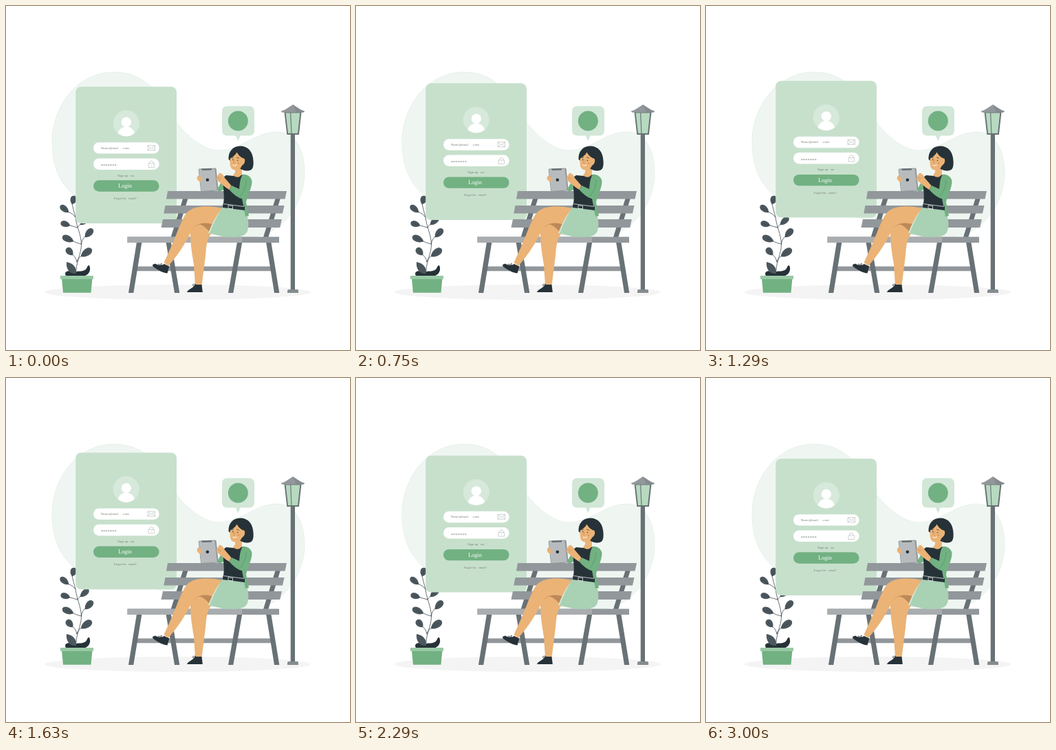
An HTML page for the animation above (3040 ms loop, 500x500 px).

```html
<!DOCTYPE html>
<html lang="en">
<head>
<meta charset="utf-8">
<title>Login on a park bench</title>
<style>
  html, body { margin: 0; width: 100%; height: 100%; overflow: hidden; background: #fff; }
  svg { display: block; width: 100vw; height: 100vh; }
  text { font-family: "Liberation Serif", "Noto Serif", serif; font-size: 5px; fill: #758179; white-space: pre; }
  .small { font-size: 4.4px; }
  .dark { fill: #263238; }
  .steel { fill: #687175; }
  .slat { fill: #92979b; }
  .green { fill: #72b182; }
  .skin { fill: #ebb376; }
  .shade { fill: #bd8958; }
  .line { fill: none; stroke: #b4bbb7; stroke-width: .65; }
  .ink { fill: none; stroke: #263238; stroke-width: .7; stroke-linecap: round; }
</style>
</head>
<body>
<svg viewBox="0 0 500 500">
  <defs>
    <clipPath id="disc"><circle cx="174.8" cy="170.4" r="19"/></clipPath>
  </defs>

  <path fill="#eff6f2" stroke="#d6e6db" stroke-width=".5" d="M157 96C105 96 67 144 67 198C67 235 80 262 105 280C140 303 210 296 250 318C288 335 330 337 362 335C400 331 434 288 434 243C434 207 419 183 394 183C362 183 341 210 309 210C286 209 264 189 249 171C231 147 214 96 157 96Z"/>
  <ellipse cx="249.5" cy="416" rx="193.5" ry="11" fill="#f4f4f4"/>

  <g id="plant">
    <path class="ink" stroke-width="1" d="M102 391C100 375 110 360 109.500 346C109 332 103 322 101 307C99 299 97 293 96 287M101 307C98 303 95 301 91 299.500M104 322C100 321 97 320 93 319M104 322C105 320 106 319 108 317.500M109.500 346C105 345 102 344 98 342M109.500 346C110 341 112 338 115 335M103 372C102 367 100 364 97 361.500M103 372C104 368 106 366 109 363.500"/>
    <g id="leaves" fill="#4b575d"></g>
    <path class="dark" d="M87 392C84 387 89 384 95 386C94 381 98 381 101 387C104 384 109 387 114 384C119 382 117 377 121 377C124 383 121 390 115 392Z"/>
    <path fill="#4b575d" d="M102 389C92 390 87 382 88 372C97 374 103 379 102 389Z"/>
    <path class="green" d="M81 396H125.500L123.500 416.800H83Z"/>
    <path fill="#98c9a4" d="M79 392H127V397H79Z"/>
  </g>

  <g id="card">
    <rect x="101.200" y="117.200" width="146.800" height="198.800" rx="8" fill="#c7e0cc"/>
    <circle cx="174.800" cy="170.400" r="19" fill="#d6e9db"/>
    <g fill="#fff">
      <circle cx="174.800" cy="168.800" r="7.200"/>
      <path clip-path="url(#disc)" d="M161 192C162 181 167 175.500 174.800 175.500S187.600 181 188.600 192Z"/>
      <rect x="127" y="198.200" width="95.600" height="16.400" rx="8.200"/>
      <rect x="127" y="221.500" width="95.600" height="16.400" rx="8.200"/>
    </g>
    <rect class="green" x="127" y="253.300" width="95.600" height="16.400" rx="8.200"/>
    <path class="line" d="M206 202.700H216.500V209.700H206ZM206 202.700L211.250 207L216.500 202.700M206 209.700L209.800 206M216.500 209.700L212.700 206"/>
    <path class="line" d="M207 229H215.600V234.500H207ZM208.600 229V227.500Q208.600 225.400 211.300 225.400T214 227.500V229M211.300 231V232.500"/>
    <text x="137.700" y="207.700">Name@mail</text>
    <text x="169" y="207.700">.com</text>
    <text x="137.700" y="234.200" style="font-size:6.600px">*******</text>
    <text x="162" y="247.600">Sign up</text>
    <text x="181" y="247.600">on</text>
    <text x="173" y="264.200" text-anchor="middle" style="font-size:8.200px;fill:#fff">Login</text>
    <text class="small" x="156.500" y="281">Forgot the</text>
    <text class="small" x="178" y="281">email?</text>
  </g>

  <g id="bubble">
    <path fill="#d2e7d7" d="M322 145.500H353Q361 145.500 361 153.500V180.500Q361 188.500 353 188.500H340.500L337.300 196.500L334 188.500H322Q314 188.500 314 180.500V153.500Q314 145.500 322 145.500Z"/>
    <circle class="green" cx="337.300" cy="167" r="14.500"/>
  </g>

  <g id="lamp">
    <path class="steel" d="M413.700 187H420V413H413.700Z"/>
    <path fill="#858c90" d="M409 417V414Q409 412 411 412H423Q425 412 425 414V417Z"/>
    <path class="steel" d="M404.500 154H429.500L425.800 187H408.300Z"/>
    <path fill="#b7d9c0" d="M406.600 155.500H427.300L424 185H410Z"/>
    <path stroke="#687175" stroke-width="1.100" d="M413.600 155L415 186"/>
    <path class="slat" d="M417 143.300L425 148.500Q429 151.500 434.300 153L432 154.800H401.500L399.500 153Q405 151.500 409 148.500Z"/>
    <path class="steel" d="M417 143.300L425 148.500Q429 151.500 434.300 153L432 154.800H422Z" opacity=".3"/>
  </g>

  <g id="bench">
    <path class="steel" d="M257.400 279H264.700L247 336H239.700ZM391.800 279H399L381.300 336H374Z"/>
    <path class="slat" d="M235 269H408L405.500 280.500H233ZM231.500 290H404.500L402 301.500H229.300ZM228 310H400.800L398.300 322H225.500ZM190 378.500H388V385.300H190Z"/>
    <path class="steel" d="M190 343H197.500L185.300 417H178ZM232.500 343H239.800L252.300 417H245ZM336 343H343.300L330.300 417H323ZM378 343H385.300L397.300 417H390Z"/>
    <path class="slat" d="M176.500 335.500H397V344H176.500Z"/>
    <path fill="#a9adaf" d="M176.500 335.500H343V344H176.500Z"/>
  </g>

  <g id="woman">
    <!-- legs and shoes -->
    <path class="skin" d="M268 330C268 318 280 313 294 315L299 330C292 337 291 350 290 363L284.500 406H275L273 376C270 358 268 345 268 330Z"/>
    <path class="shade" d="M269 327C275 316 284 313 294 315L304 317L298 331C293 325 289 320 282 317.500C277 318 273 321 269 327Z"/>
    <path class="skin" d="M315 294C298 290 275 289 264 299C256 308 249 329 240 350L229.500 373L236 378C248 364 261 346 270 326C276 316 287 312 306 319Z"/>
    <path class="dark" d="M213 376L217 374.500C221 377 225 378 230 375L237.300 378.500L234.500 388.500C227 388 220 383 213.500 378.500ZM263 416C264 412 271 411 275 405H284.500L285.800 416Z"/>
    <path class="ink" d="M226 377Q220 373 221 377L226 377Q224 372 227 375M276 406Q270 402 272 407L276 406Q273 402 276 405"/>

    <!-- skirt -->
    <path fill="#a9d1b4" d="M315 292L347 296C352 305 354 317 351 327C348 337 330 337 315 335L294 330C301 318 306 304 315 292Z"/>
    <path fill="#d2e7d7" d="M312 297C305 308 300 320 296 330.500L294 330C299 317 305 305 312 297Z"/>

    <!-- far sleeve, torso, jacket -->
    <path class="green" d="M318 248C313 254 310 263 306 267L310 270L320 265Z"/>
    <path class="dark" d="M320 246L331 247L346 245L349 271L347 291L315.500 289C319 277 314 260 316 249Z"/>
    <path class="skin" d="M333 232L343 236L343 244C339 252 332 248 330 246L333 242Z"/>
    <path class="green" d="M344 245C350 244 356 248 357.500 254C358 263 351 276 349 285L353 305L348 306L343 280C337 279 330 273 324.500 267L328 261L339 266C340 258 340 251 344 245Z"/>
    <path fill="none" stroke="#559467" stroke-width=".7" d="M349 253C349 261 346 268 342 274L339 277"/>
    <path class="dark" d="M315.500 287.500L347 291V297L315 293Z"/>
    <path fill="none" stroke="#fff" stroke-width=".7" d="M316 287.500L346 291.500M323 289.700L329.500 290.500V295L323 294.200Z"/>

    <!-- tablet and hands -->
    <path fill="#8f969a" d="M281 236.500L304 235.500Q305.500 235.500 305.700 237L308.500 266Q308.500 268 307 268.500L285 270Q283.300 270 283 268L279.700 238.500Q279.500 236.700 281 236.500Z"/>
    <path fill="#b8bbbd" d="M280.300 237.500L303.500 236.500L306.700 267.500L283.800 269Z"/>
    <path class="steel" d="M284 236.500L299 236V238.500L285 239Z"/>
    <circle class="dark" cx="292.800" cy="252.800" r="2.300"/>
    <path class="skin" d="M280 246C276.500 248 277 253 281 255L285 255.500L284.500 252L286 250L282 249ZM306 249L310 243C313 242 316 246 318 250L327.500 261L324.500 267C317 263 311 256 306 253Z"/>
    <path fill="none" stroke="#bd8958" stroke-width=".6" d="M307 250L311 249M309 253L313 250"/>

    <!-- head -->
    <path class="dark" d="M323.500 223C323 212 329 203.500 341 203.500C353 204 359 213 359.500 225C360 232 359 237 355.500 238.500C350 240.500 344 239 340 236Z"/>
    <path class="skin" d="M335.500 212.500C334 216 329 220 326 221.500C325 227 325.500 233 328 236.500C332 240 340 239 343 232C347 230 348.500 224 346 221.500C342 221 338 217 335.500 212.500Z"/>
    <path class="ink" d="M328.500 221L330.500 220M335.500 220L338.500 221.200"/>
    <circle class="dark" cx="329.800" cy="223.500" r=".75"/>
    <circle class="dark" cx="336.500" cy="224.500" r=".75"/>
    <path fill="none" stroke="#bd8958" stroke-width=".7" d="M332 223.500L330.500 228L332.500 228.300"/>
    <path fill="none" stroke="#fff" stroke-width="1" stroke-linecap="round" d="M330 231.500Q333 233.300 335.500 231"/>
    <circle fill="#e59a68" cx="338" cy="228.500" r="1.500"/>
  </g>
</svg>

<script>
const LOOP = 3040, TOP_AT = 1490, REST_AT = 2960, LIFT = 9.7;
const card = document.getElementById("card");

// Leaf blades: base point, tip, half width.
const blades = [
  [96, 288, 100, 276, 5.5], [91, 300, 79, 290, 5],
  [93, 319, 79.5, 315, 5], [108, 318, 120, 307, 5],
  [115, 336, 126, 324, 5.5], [98, 342, 82, 335, 5.5],
  [97, 362, 88, 352, 5.5], [109, 364, 124.5, 353, 6]
];

function blade([x, y, tx, ty, w]) {
  const dx = tx - x, dy = ty - y, len = Math.hypot(dx, dy);
  const nx = -dy / len * w, ny = dx / len * w;
  const side = s => [x + dx * .2 + s * nx, y + dy * .2 + s * ny,
                     x + dx * .95 + s * nx * 1.3, y + dy * .95 + s * ny * 1.3];
  const [a, b, c, d] = side(1), [e, f, g, h] = side(-1);
  return `<path d="M${x} ${y}C${a} ${b} ${c} ${d} ${tx} ${ty}C${g} ${h} ${e} ${f} ${x} ${y}Z"/>` +
         `<path class="ink" style="stroke-width:.4" d="M${x} ${y}L${x + dx * .7} ${y + dy * .7}"/>`;
}
document.getElementById("leaves").innerHTML = blades.map(blade).join("");

function lift(t) {
  if (t < TOP_AT) return LIFT * t / TOP_AT;
  return LIFT * Math.max(0, (REST_AT - t) / (REST_AT - TOP_AT));
}

const start = performance.now();
function draw() {
  const t = (performance.now() - start) % LOOP;
  card.setAttribute("transform", `translate(0 ${-lift(t).toFixed(3)})`);
  requestAnimationFrame(draw);
}
draw();
</script>
</body>
</html>
```
